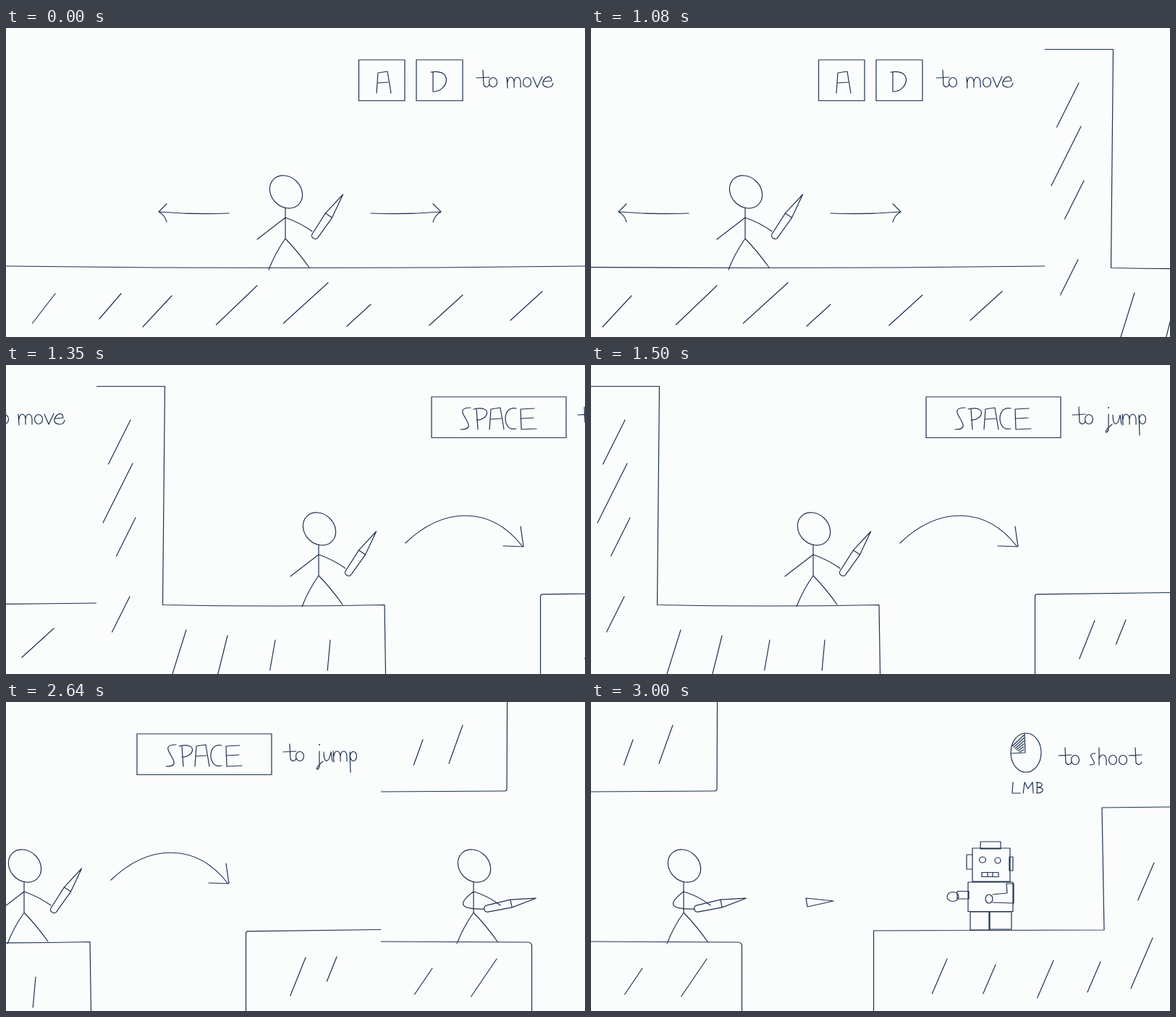
An HTML page with a canvas for the animation above (3.93 s loop, 800 by 427 pixels).

```html
<!DOCTYPE html>
<html lang="en">
<head>
<meta charset="utf-8">
<title>Controls tutorial</title>
<style>
html, body { margin: 0; width: 100%; height: 100%; overflow: hidden; background: #fbfdfd; }
canvas { display: block; }
</style>
</head>
<body>
<canvas id="stage" width="800" height="427"></canvas>
<script>
const W = 800, H = 427;
const PAPER = '#fbfdfd', INK = '#1f3150', SEAM = '#dde4e9';
const LOOP = 3930, STEP = 30, STEPS = 20, SLIDES = [930, 2430];
const ctx = document.getElementById('stage').getContext('2d');

class Sketch extends Path2D {
  // Pen stroke whose middle is pushed sideways by `bend`.
  bow(x1, y1, x2, y2, bend = 0) {
    const dx = x2 - x1, dy = y2 - y1, k = 2 * bend / Math.hypot(dx, dy);
    this.moveTo(x1, y1);
    this.quadraticCurveTo((x1 + x2) / 2 - dy * k, (y1 + y2) / 2 + dx * k, x2, y2);
    return this;
  }

  swing(x, y, ...controls) {
    this.moveTo(x, y);
    this.bezierCurveTo(...controls);
    return this;
  }

  // Polyline with rounded corners.
  path(radius, x, y, ...rest) {
    this.moveTo(x, y);
    for (let i = 0; i < rest.length - 2; i += 2) {
      this.arcTo(...rest.slice(i, i + 4).slice(0, 4), radius);
    }
    this.lineTo(...rest.slice(-2));
    return this;
  }

  box(x, y, w, h) {
    this.rect(x, y, w, h);
    return this;
  }

  oval(x, y, rx, ry = rx, turn = 0) {
    const part = new Path2D();
    part.ellipse(x, y, rx, ry, turn, 0, Math.PI * 2);
    this.addPath(part);
    return this;
  }

  hump(x, w, h) {
    this.moveTo(x, -h / 2);
    this.ellipse(x + w / 2, -h / 2, w / 2, h / 2, 0, Math.PI, Math.PI * 2);
    this.lineTo(x + w, 0);
    return this;
  }

  ess(w, h) {
    return this.swing(w, -h, -1.3 * w, -h, 2.3 * w, 0, 0, 0);
  }

  // Shading strokes given as top point and height; lean may depend on x.
  hatch(lean, ...strokes) {
    for (const [x, y, h] of strokes) {
      const slope = typeof lean === 'function' ? lean(x) : lean;
      this.bow(x, y, x - slope * h, y + h);
    }
    return this;
  }

  place(part, x = 0, y = 0, angle = 0, scale = 1) {
    this.addPath(part, new DOMMatrix().translate(x, y).rotate(angle).scale(scale));
    return this;
  }

  write(text, x, y, scale = 1) {
    for (const char of text) {
      const [advance, pen] = GLYPHS[char];
      const glyph = new Sketch();
      pen(glyph);
      this.place(glyph, x, y, 0, scale);
      x += advance * scale;
    }
    return this;
  }
}

// Handwriting: advance width and strokes, with the baseline at y = 0.
const GLYPHS = {
  ' ': [10, () => {}],
  t: [17, p => p.bow(9, -24, 10, -3).bow(10, -3, 18, -4, 3).bow(0, -13, 18, -14)],
  o: [14, p => p.oval(6, -7, 5.5, 6.5)],
  m: [23, p => p.bow(1, -14, 2, 1).hump(2, 9, 14).hump(11, 9, 14)],
  v: [14, p => p.bow(0, -14, 6, 0).bow(6, 0, 13, -15)],
  e: [15, p => p.bow(1, -8, 12, -9).swing(12, -9, 10, -25, -11, -2, 7, 0).bow(7, 0, 14, -6, 2)],
  j: [14, p => p.bow(9, -14, 9, 6).swing(9, 6, 9, 14, -2, 13, 14, 0).oval(9, -23, 0.4)],
  u: [13, p => p.swing(1, -13, 1, 4, 8, 3, 11, -13).bow(11, -13, 13, 0)],
  p: [13, p => p.bow(1, -13, 2, 15).oval(6, -7, 4.5, 6.5)],
  s: [14, p => p.place(new Sketch().ess(8, 16), 2)],
  h: [14, p => p.bow(1, -24, 1, 0).hump(1, 10, 14)],
  A: [22, p => p.path(0, 0, 0, 2, -28, 15, -30, 20, 0).bow(1, -14, 16, -15)],
  B: [20, p => p.bow(2, -29, 2, 0).swing(0, -28, 22, -30, 18, -15, 2, -15).swing(2, -15, 26, -16, 20, 0, 0, 0)],
  C: [20, p => p.swing(15, -29, -5, -34, -5, 4, 15, -1)],
  D: [22, p => p.bow(3, -27, 3, -1).swing(0, -27, 32, -32, 24, 0, 3, 0)],
  E: [20, p => p.path(0, 20, -29, 1, -28, 2, 0, 23, -1).bow(1, -15, 19, -16)],
  L: [29, p => p.path(0, 2, -29, 0, 0, 22, 0)],
  M: [35, p => p.path(0, 0, 0, 4, -29, 13, -12, 25, -29, 27, 0)],
  P: [22, p => p.bow(4, -28, 6, 0).swing(0, -28, 28, -34, 20, -12, 4, -13)],
  S: [18, p => p.ess(14, 30)]
};

// Figures stand with the neck at x = 0.
const weapon = new Sketch()
  .path(4, 0, -5.5, -38, -4.5, -38, 4.5, 0, 5.5)
  .path(0, 0, -5.5, 35, 0, 0, 5.5, 0, -5.5);

const figure = new Sketch()
  .oval(1, 226.5, 24.5, 20.5, Math.PI / 4)
  .bow(0, 248, 0, 291)
  .bow(0, 291, -23, 334, 1.5)
  .bow(0, 291, 33, 331, -1);

const swordsman = new Sketch().place(figure)
  .bow(0, 262, -39, 292)
  .bow(0, 262, 37, 281, -1.5)
  .place(weapon, 60, 259, -56);

const gunner = new Sketch().place(figure)
  .swing(0, 262, -20, 277, -23, 287, 15, 286)
  .bow(0, 262, 37, 281, -2)
  .place(weapon, 52, 278.5, -12);

const arrow = new Sketch()
  .bow(0, 256, 97, 254, 1.5)
  .bow(86, 243, 97, 254)
  .bow(97, 254, 86, 268, 2);

const mouse = new Sketch().oval(601, 70, 21, 27).path(0, 599, 43, 600, 70, 581, 71);
for (let i = 0; i < 6; i++) mouse.bow(598, 46 + 4 * i, 582 + 2 * i, 61 + 1.6 * i);

const robot = new Sketch()
  .box(538, 193, 28, 10).box(527, 202, 52, 46)
  .box(519, 211, 8, 20).box(578, 214, 5, 19)
  .oval(541, 218, 4.5, 4).oval(562, 219, 4)
  .box(540, 235.5, 23, 6).bow(548, 236, 548, 241).bow(555, 236, 555, 241)
  .box(521, 249, 62, 40.5)
  .path(0, 555, 266, 575, 264, 574, 251, 584, 251, 584, 278, 555, 277)
  .oval(550, 272, 5, 6)
  .box(506, 261.5, 16, 10.5).oval(500, 269, 8, 6.5)
  .box(524, 290, 26, 25).box(551, 290, 30, 24);

const walk = new Sketch()
  .box(487.5, 44, 63.5, 56.5).box(567, 44, 64, 56.5)
  .write('A', 512, 90).write('D', 587, 88).write('to move', 650, 82)
  .place(arrow, 504)
  .place(swordsman, 386)
  .bow(0, 329, W, 329, 2.5)
  .hatch(x => Math.min(1.1, 0.7 + x / 1000),
    [68, 367, 41], [159, 367, 35], [229, 370, 43], [347, 356, 54],
    [445, 352, 56], [504, 382, 30], [631, 369, 42], [741, 364, 40]);
walk.addPath(arrow, new DOMMatrix([-1, 0, 0, 1, 308, 0]));

const jump = new Sketch()
  .box(463, 44, 186, 56.5)
  .write('SPACE', 503, 89).write('to jump', 665, 82)
  .swing(427, 246, 480, 195, 545, 195, 588, 250)
  .path(0, 586, 223, 590, 251, 562, 250)
  .place(swordsman, 307)
  .path(0, 0, 29.5, 94.5, 29.5, 91.5, 331.5)
  .bow(91.5, 331.5, 398, 331.5, 1.5)
  .bow(398, 331.5, 399.5, 427)
  .path(3, 613.5, 427, 613.5, 317, W, 314.5)
  .hatch(0.5, [47, 76, 61], [50, 136, 82], [54, 211, 53], [46, 320, 49])
  .hatch(x => 0.45 - x / 900, [124, 366, 61], [181, 374, 53], [247, 380, 42], [323, 380, 42])
  .hatch(0.4, [696, 353, 53], [739, 352, 34]);

const shoot = new Sketch()
  .place(mouse).write('LMB', 582, 126, 0.52).write('to shoot', 646, 87)
  .place(gunner, 128).place(robot)
  .path(0, 297, 271, 335, 275, 299, 283, 297, 271)
  .path(3, 174.5, 0, 174, 123, 0, 124)
  .path(5, 0, 331, 208.5, 332, 208.5, 427)
  .path(0, 390.5, 427, 390.5, 316, 709, 315, 706, 146, W, 145)
  .hatch(0.36, [58, 52, 35], [113, 32, 53])
  .hatch(0.68, [71, 368, 36], [160, 355, 52])
  .hatch(0.43, [492, 355, 48], [559, 363, 40], [639, 357, 52],
    [704, 359, 42], [776, 326, 70], [778, 222, 52]);

const screens = [walk, jump, shoot];

function slideOffset(time, start) {
  const step = Math.floor((time - start) / STEP) + 1;
  const p = Math.max(0, Math.min(1, step / STEPS));
  return Math.round(W * p * p * (3 - 2 * p));
}

function draw(time) {
  const scroll = SLIDES.reduce((sum, start) => sum + slideOffset(time, start), 0);
  ctx.fillStyle = PAPER;
  ctx.fillRect(0, 0, W, H);
  ctx.strokeStyle = INK;
  ctx.lineWidth = 1.2;
  ctx.lineJoin = ctx.lineCap = 'round';
  screens.forEach((screen, i) => {
    const x = i * W - scroll;
    if (Math.abs(x) >= W) return;
    ctx.save();
    ctx.beginPath();
    ctx.rect(x, 0, W, H);
    ctx.clip();
    ctx.translate(x, 0);
    ctx.stroke(screen);
    ctx.restore();
    // The incoming edge shows faintly as a slide begins.
    if (x > W - 10) {
      ctx.fillStyle = SEAM;
      ctx.fillRect(x, 0, 1, H);
    }
  });
}

function tick() {
  draw(performance.now() % LOOP);
  requestAnimationFrame(tick);
}
tick();
</script>
</body>
</html>
```
